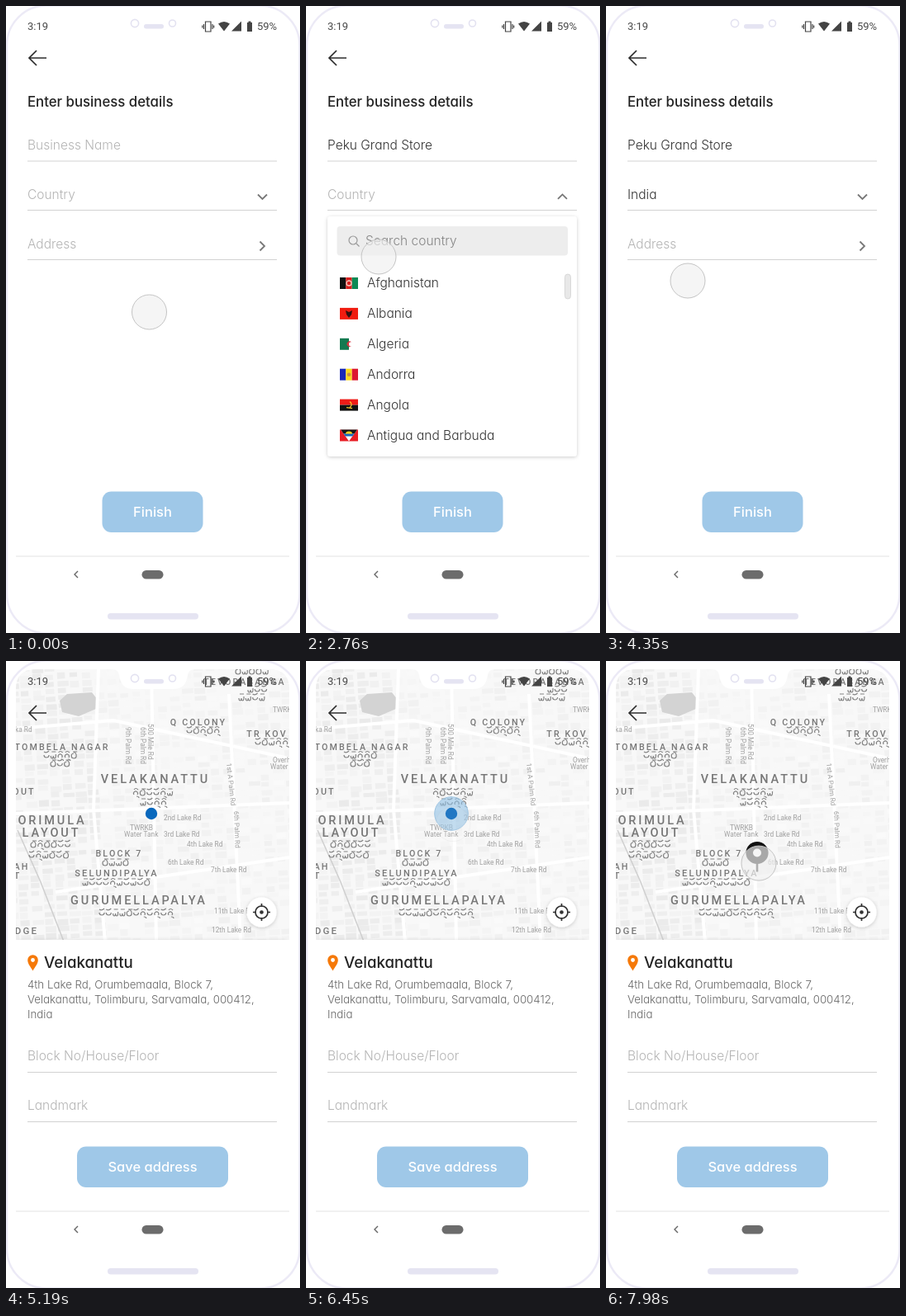
These frames come from a looping animation (356 px wide and 760 px high, 8 s). An HTML page:

```html
<!DOCTYPE html>
<html lang="en">
<head>
<meta charset="utf-8">
<title>Business details form</title>
<style>
  html, body { margin: 0; width: 100%; height: 100%; overflow: hidden; background: #fff; }
  svg { display: block; width: 100%; height: 100%; font: 300 15.5px Inter, sans-serif; font-feature-settings: "cv11"; }
  .hint { fill: #b4b4b4; }
  .value { fill: #333; }
  .strong { font-weight: 500; font-size: 16.8px; fill: #222; }
  .button { font-weight: 500; font-size: 16.5px; fill: #fff; text-anchor: middle; }
  .address { font-size: 13.3px; fill: #666; }
  .status { font: 400 13px Roboto, sans-serif; fill: #484848; }
  .rule { stroke: #d2d2d2; }
  .line { fill: none; stroke: #777; stroke-width: 1.8; }
  .place { font: 500 11px Roboto, sans-serif; letter-spacing: .2em; fill: #777; text-anchor: middle; }
  .road { font: 400 8.3px Roboto, sans-serif; fill: #a0a0a0; }
</style>
</head>
<body>
<svg viewBox="0 0 356 760">
  <defs>
    <clipPath id="screen"><path d="M12 338V34Q12 10 36 10H319Q343 10 343 34V338Z"/></clipPath>
    <filter id="soft" x="-20%" y="-20%" width="140%" height="140%">
      <feDropShadow dx="0" dy="1" stdDeviation="2" flood-opacity=".2"/>
    </filter>
  </defs>
  <rect width="356" height="760" fill="#fff"/>

  <g id="form">
    <text class="strong" x="26" y="122">Enter business details</text>
    <text id="name" x="26" y="174"></text>
    <text id="country" x="26" y="234"></text>
    <text class="hint" x="26" y="294">Address</text>
    <path class="rule" d="M26 188H328M26 247.5H328M26 307.5H328"/>
    <path id="arrow" class="line" d="M305 228.500l5.500 5.500l5.500-5.500"/>
    <path class="line" d="M307.500 285.500l5.500 5.500l-5.500 5.500"/>
    <rect x="116.5" y="588.5" width="122" height="49.5" rx="11" fill="#9fc8e8"/>
    <text class="button" x="177.5" y="619">Finish</text>
    <g id="dropdown">
      <rect x="26" y="255" width="302" height="291" rx="4" fill="#fff" filter="url(#soft)"/>
      <rect x="37.5" y="267" width="279.500" height="35.500" rx="4" fill="#ededed"/>
      <g fill="none" stroke="#999" stroke-width="1.2"><circle cx="57" cy="284" r="5"/><path d="M61 288l3.500 3.500"/></g>
      <text id="search" x="72" y="290"></text>
      <g id="rows"></g>
      <rect x="313.5" y="325" width="7" height="30" rx="3.5" fill="#e8e8e8" stroke="#d8d8d8"/>
    </g>
  </g>

  <g id="place">
    <rect x="12" y="10" width="331" height="656" rx="24" fill="#fff"/>
    <g clip-path="url(#screen)">
      <g id="map"></g>
      <path d="M128 10Q136 10 137 17Q139 34 154 34H203Q218 34 220 17Q221 10 229 10Z" fill="#fff"/>
      <g id="dot">
        <circle id="halo" cx="176" cy="185" fill="#8fc0e4" fill-opacity=".6" stroke="#9cc3e0"/>
        <circle cx="176" cy="185" r="7.2" fill="#0868bd"/>
      </g>
      <g id="pin">
        <path d="M-1.300 11V23H1.300V11Z" fill="#222"/>
        <circle r="13.600" fill="#111"/><circle r="5" fill="#fff"/>
      </g>
      <g filter="url(#soft)">
        <circle cx="309.5" cy="304.5" r="18" fill="#fff"/>
        <rect x="12" y="338" width="331" height="40" rx="8" fill="#fff"/>
      </g>
      <g fill="none" stroke="#333" stroke-width="1.7">
        <circle cx="309.5" cy="304.5" r="7.500"/>
        <path d="M309.500 294v4m0 13v4M299 304.500h4m13 0h4"/>
        <circle cx="309.5" cy="304.5" r="1.500" fill="#333"/>
      </g>
    </g>
    <path d="M32.500 375.500C30 371 26.200 367 26.200 362.500A6.300 6.300 0 0 1 38.800 362.500C38.800 367 35 371 32.500 375.500Z" fill="#f57909"/>
    <circle cx="32.5" cy="362.5" r="2.4" fill="#fff"/>
    <text class="strong" x="46" y="372" style="font-size:18.7px">Velakanattu</text>
    <g class="address">
      <text x="26" y="397">4th Lake Rd, Orumbemaala, Block 7,</text>
      <text x="26" y="415">Velakanattu, Tolimburu, Sarvamala, 000412,</text>
      <text x="26" y="433">India</text>
    </g>
    <text class="hint" x="26" y="484">Block No/House/Floor</text>
    <text class="hint" x="26" y="544">Landmark</text>
    <path class="rule" d="M26 498.500H328M26 558.500H328"/>
    <rect x="86" y="588.5" width="183" height="49.500" rx="11" fill="#9fc8e8"/>
    <text class="button" x="177.5" y="619">Save address</text>
  </g>

  <g id="chrome">
    <path d="M49 63H28M37 54L28 63L37 72" fill="none" stroke="#2c2c2c" stroke-width="1.7"/>
    <text class="status" x="26" y="29">3:19</text>
    <text class="status" x="304" y="29">59%</text>
    <g fill="#444">
      <path d="M241.500 19h6.500v12h-6.500zM239.500 22v6M250 22v6M237.800 23.500v3M251.700 23.500v3" fill="none" stroke="#444" stroke-width="1.200"/>
      <path d="M257 21.500Q264 16.500 271 21.500L264 30.500ZM273 30.500L285 18.500V30.500ZM292 20h1.500v-1.500h3V20H298V31H292Z"/>
    </g>
    <g fill="none" stroke="#e3e2f1" stroke-width="1.600">
      <circle cx="156" cy="21" r="4.600"/><circle cx="201.500" cy="21" r="4"/>
      <rect x="1" y="-.5" width="354.500" height="761" rx="48" stroke="#eceaf6" stroke-width="2.500"/>
    </g>
    <g fill="#e5e4f2">
      <rect x="167" y="22" width="24" height="5.500" rx="2.700"/>
      <rect x="123" y="736" width="110" height="7.500" rx="3.700"/>
    </g>
    <path d="M12 667H343" stroke="#e2e2e2"/>
    <path d="M87 685l-4 4l4 4" fill="none" stroke="#666" stroke-width="1.400"/>
    <rect x="164.500" y="684" width="26" height="10.500" rx="5.200" fill="#6c6c6c"/>
  </g>
  <circle id="cursor" r="21" fill="#f0f0f0" fill-opacity=".68" stroke="#c4c4c4"/>
</svg>

<script>
const LOOP = 8000, BUSINESS = 'Peku Grand Store', QUERY = 'India';
const el = id => document.getElementById(id);
const clamp = v => Math.max(0, Math.min(1, v));
const progress = (t, from, to) => clamp((t - from) / (to - from));
const ease = p => p * p * (3 - 2 * p);
const fade = (t, from, to) => ease(progress(t, from, to));
const rect = (x, y, w, h, fill) => `<rect x="${x}" y="${y}" width="${w}" height="${h}" fill="${fill}"/>`;

let seed = 11;
const random = () => (seed = (seed * 16807) % 2147483647) / 2147483647;

// Flags on a 22 x 14 field
const columns = (...c) => c.map((f, i) => rect(i * 22 / c.length, 0, 22 / c.length, 14, f)).join('');
const bands = (...c) => c.map((f, i) => rect(0, i * 14 / c.length, 22, 14 / c.length, f)).join('');
const disc = (r, fill) => `<circle cx="11" cy="7" r="${r}" fill="${fill}"/>`;
const countries = [
  ['Afghanistan', columns('#111', '#d8201f', '#0c8a55') + '<circle cx="11" cy="7" r="3" fill="none" stroke="#f5c9bd" stroke-width="1.3"/>'],
  ['Albania', bands('#f01c10') + '<path d="M7 3l4 2l4-2l-1 5l-3 4l-3-4Z" fill="#301010"/>'],
  ['Algeria', columns('#147a50', '#fff') + '<path d="M14 4.500A3.300 3.300 0 1 0 14 9.500A2.600 2.600 0 1 1 14 4.500Z" fill="#d8323e"/>'],
  ['Andorra', columns('#1828b8', '#fbd91c', '#dc1830') + disc(2.2, '#c89048')],
  ['Angola', bands('#ee1c18', '#111') + '<path d="M8 10l7 1M12 3a4 4 0 0 1 0 7" fill="none" stroke="#f2c62a" stroke-width="1.300"/>'],
  ['Antigua and Barbuda', bands('#e81c24') + '<path d="M1 0H21L11 14Z" fill="#fff"/><path d="M1 0H21L17.500 5H4.500Z" fill="#151515"/><path d="M4.500 5H17.500L15.300 8H6.700Z" fill="#1764b8"/><path d="M7 5a4 3 0 0 1 8 0Z" fill="#f8d020"/>'],
  ['India', bands('#ff9a33', '#fff', '#138808') + disc(1.7, '#26368c')],
  ['Indonesia', bands('#e8141c', '#fff')],
];

const mapLabels = [ // text, x, y, size
  ['TEVORASANGA', 289, 29, 10.7], ['Q COLONY', 233, 78, 10.7], ['TOMBELA NAGAR', 68, 108, 10.7],
  ['TR KOV', 316, 92, 10.7], ['VELAKANATTU', 181, 148, 14.5], ['ORIMULA', 56, 198, 14.5],
  ['LAYOUT', 55, 213, 14.5], ['BLOCK 7', 137, 237, 10.7], ['SELUNDIPALYA', 134, 261, 11],
  ['GURUMELLAPALYA', 161, 295, 14.5], ['OUT', 22, 162, 10.7], ['AH', 19, 253, 10.7], ['T', 14, 264, 10.7], ['DGE', 25, 331, 11.5],
];
const roadLabels = [ // text, x, y, turn
  ['2nd Lake Rd', 191, 193], ['3rd Lake Rd', 191, 213], ['4th Lake Rd', 219, 225], ['6th Lake Rd', 196, 247],
  ['7th Lake Rd', 248, 256], ['11th Lake Rd', 252, 306], ['12th Lake Rd', 249, 329], ['ka Rd', 11, 86],
  ['TWRKB', 150, 205], ['Water Tank', 143, 213], ['TWRKB', 323, 62], ['Overhead', 323, 123], ['Water', 320, 131],
  ['9th Palm Rd', 145, 80, 90], ['6th Palm Rd', 163, 80, 90], ['500 Mile Rd', 172, 76, 90],
  ['1st A Palm Rd', 267, 124, 84], ['6th Palm Rd', 276, 182, 88],
];
// Rounded regional lettering: center x, baseline, width
const scriptLines = [
  [300, 16, 44], [304, 38, 22], [300, 48, 36], [239, 88, 40], [67, 118, 42], [66, 128, 24], [322, 102, 40],
  [180, 163, 52], [180, 175, 34], [54, 226, 48], [54, 239, 52], [136, 248, 38], [133, 272, 80], [159, 309, 92],
];
const letterShapes = [
  'm0 -4a3 3 0 1 0 6 0m-6 -4q3 2 6 -1',
  'm3 -6a3 3 0 1 0 3 3q0 -4 -4 -5h5',
  'm0 -3a1.500 3 0 0 0 3 0a1.500 3 0 0 0 3 0v-2m-5 -3h5',
  'm1 -1a2.500 2.500 0 1 1 4 0m-4 -6q2 -3 5 0m-2 8q3 0 3 2',
];

function scriptLine([center, y, width]) {
  let d = '';
  for (let x = center - width / 2; x < center + width / 2 - 5; x += 8.3) {
    d += `M${x} ${y}` + letterShapes[Math.floor(random() * letterShapes.length)];
  }
  return `<path d="${d}" fill="none" stroke="#858585" stroke-width="1.2"/>`;
}

function buildMap() {
  let out = rect(12, 10, 331, 330, '#f8f8f8') + '<g transform="rotate(-3 176 170)">';
  for (let x = -5; x < 360; x += 15) {
    for (let y = -10; y < 355; y += 9) {
      const tone = Math.round((x < 110 ? 234 : 240) + random() * 10);
      if (random() < .87) out += rect(x, y + random() * 3, 9 + random() * 5, 5 + random() * 3, `rgb(${tone},${tone},${tone})`);
    }
  }
  out += '</g><path d="M65 48L74 40L104 38L111 47L109 58L88 67L68 62Z" fill="#d3d3d3"/>';
  out += '<g fill="none" stroke="#fff" stroke-width="4"><path d="M176 10L182 340M12 82L130 72L343 118M270 40L284 340M112 10L106 180L120 340M12 185L343 172M60 280L343 238"/></g>';
  out += '<path d="M14 205L42 268L70 340" fill="none" stroke="#cfcfcf" stroke-width="1.5"/>';
  out += roadLabels.map(([s, x, y, turn = 0]) => `<text class="road" transform="translate(${x} ${y}) rotate(${turn})">${s}</text>`).join('');
  out += scriptLines.map(scriptLine).join('');
  return out + mapLabels.map(([s, x, y, size]) => `<text class="place" x="${x}" y="${y}" style="font-size:${size}px">${s}</text>`).join('');
}

const cursorPath = [ // time, x, y
  [750, 173.5, 371], [1260, 76, 167], [2250, 76, 167], [2490, 82, 230], [2580, 82, 230], [2760, 88, 304],
  [3570, 88, 304], [3930, 99, 333], [4380, 99, 333], [4620, 97, 291], [6100, 97, 291],
];
const clicks = [1380, 2520, 4050, 4680];

function along(path, t) {
  const next = path.findIndex(k => k[0] > t);
  if (next === 0) return path[0].slice(1);
  if (next < 0) return path[path.length - 1].slice(1);
  const [a, b] = [path[next - 1], path[next]], p = fade(t, a[0], b[0]);
  return [a[1] + (b[1] - a[1]) * p, a[2] + (b[2] - a[2]) * p];
}

function setField(id, value, hint) {
  el(id).textContent = value || hint;
  el(id).setAttribute('class', value ? 'value' : 'hint');
}

let shownQuery = null;
function showRows(query) {
  if (query === shownQuery) return;
  shownQuery = query;
  el('rows').innerHTML = countries.filter(c => c[0].startsWith(query)).slice(0, 6).map(([name, flag], i) =>
    `<g transform="translate(41 ${329 + i * 36.9})">${flag}<text class="value" x="33" y="12">${name}</text></g>`).join('');
}

function render(t) {
  const typed = (text, from, to) => text.slice(0, Math.ceil(progress(t, from, to) * text.length));
  setField('name', typed(BUSINESS, 1790, 2100), 'Business Name');
  setField('country', t >= 4080 ? QUERY : '', 'Country');

  const query = typed(QUERY, 3050, 3360);
  el('search').textContent = query || 'Search country';
  el('search').setAttribute('fill', query ? '#333' : '#858585');
  showRows(query);
  const open = fade(t, 2550, 2700) * (1 - fade(t, 4080, 4230));
  el('dropdown').setAttribute('opacity', open);
  el('arrow').setAttribute('transform', `rotate(${180 * open} 310.5 231.2)`);

  const mapShown = fade(t, 4860, 5160);
  el('place').setAttribute('opacity', mapShown);
  el('halo').setAttribute('r', 20.3 * fade(t, 5160, 5700));
  const pinShown = fade(t, 6450, 6630);
  el('dot').setAttribute('opacity', 1 - pinShown);
  el('pin').setAttribute('opacity', pinShown);

  const drag = progress(t, 7170, 7980);
  const pinX = 176 + 7 * drag, pinY = 185 + 13 * progress(t, 6870, 7170) + 34.5 * drag;
  el('pin').setAttribute('transform', `translate(${pinX} ${pinY})`);

  const dragging = t >= 6100;
  const [x, y] = dragging ? [pinX + 2, pinY + 12.6] : along(cursorPath, t);
  const press = Math.max(0, ...clicks.map(c => 1 - Math.abs(t - c) / 80));
  el('cursor').setAttribute('transform', `translate(${x} ${y}) scale(${1 - .12 * press})`);
  el('cursor').setAttribute('opacity', dragging ? fade(t, 6400, 6600) : 1 - mapShown);
}

el('map').innerHTML = buildMap();
const start = performance.now();
function frame() {
  render((performance.now() - start) % LOOP);
  requestAnimationFrame(frame);
}
frame();
</script>
</body>
</html>
```
